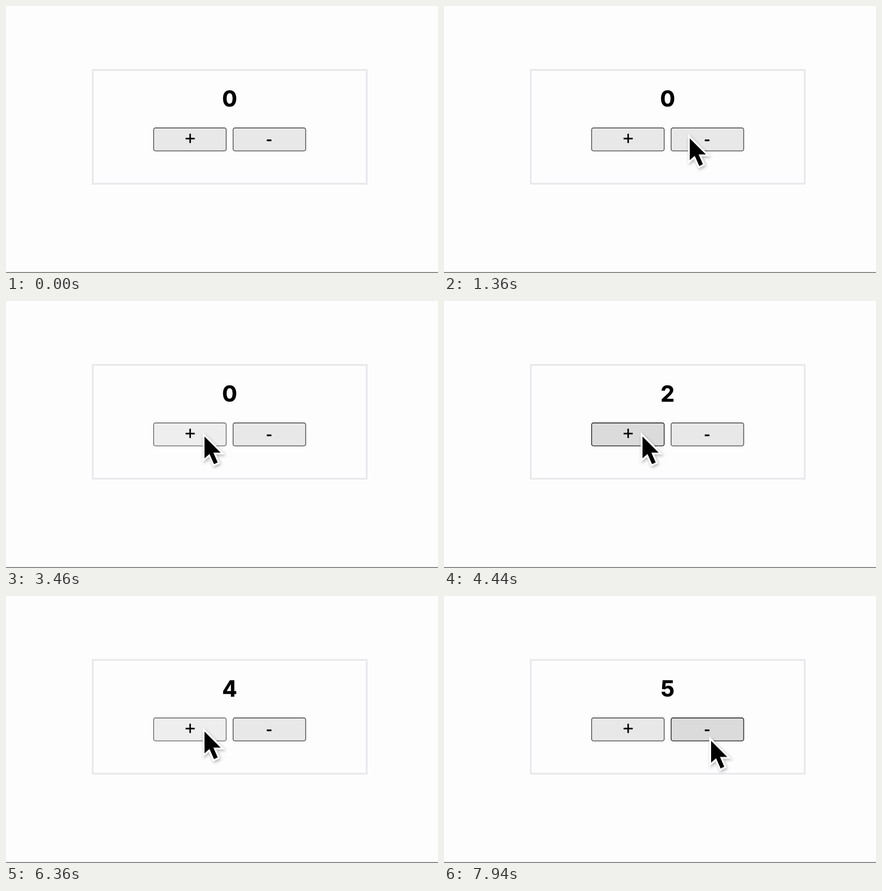
An HTML page for the animation above (8 s loop, 951 by 589 pixels).

```html
<!DOCTYPE html>
<html lang="en">
<head>
<meta charset="utf-8">
<title>Counter</title>
<style>
  html, body { margin: 0; width: 100%; height: 100%; overflow: hidden; background: #fdfdfd; }
  svg { display: block; }

  .count { font: 700 49px Inter, sans-serif; text-anchor: middle; stroke: #000; stroke-width: .6; animation: count 8s step-end infinite; }
  .sign { font: 40px "Liberation Sans", Arial, sans-serif; text-anchor: middle; stroke: #000; stroke-width: .5; }
  .button { fill: #e8e8e8; stroke: #555558; stroke-width: 1.8; }
  .plus { animation: plus 8s step-end infinite; }
  .minus { animation: minus 8s step-end infinite; }
  .pointer { animation: move 8s linear infinite, show 8s step-end infinite; filter: drop-shadow(2px 3px 3px rgba(0, 0, 0, .28)); }

  @keyframes count {
    0% { transform: translateY(0); }
    44.25% { transform: translateY(-100px); }
    45.5% { transform: translateY(-200px); }
    63.75% { transform: translateY(-300px); }
    73.5% { transform: translateY(-400px); }
    80.5%, 100% { transform: translateY(-500px); }
  }
  /* Idle, pressed (lighter) and hovered (darker) states */
  @keyframes plus {
    0%, 44.25%, 45.5%, 63.75%, 73.5%, 80.5%, 97.5%, 100% { fill: #e8e8e8; stroke: #555558; }
    43.25%, 45%, 62.5%, 72.5%, 79.5% { fill: #eee; stroke: #707070; }
    55.5%, 90.5% { fill: #dbdbdb; stroke: #2e2e2e; }
  }
  @keyframes minus {
    0% { fill: #e8e8e8; stroke: #555558; }
    97.75%, 100% { fill: #dbdbdb; stroke: #2e2e2e; }
  }
  @keyframes show {
    0% { visibility: hidden; }
    6.25%, 100% { visibility: visible; }
  }
  @keyframes move {
    0%, 6% { transform: translate(667px, 600px); animation-timing-function: cubic-bezier(.3, .4, .4, 1); }
    11.25%, 15% { transform: translate(594px, 281px); }
    17%, 18% { transform: translate(541px, 292px); animation-timing-function: cubic-bezier(.3, .2, .4, 1); }
    24%, 95% { transform: translate(437px, 299px); }
    97% { transform: translate(467.3px, 305px); }
    99.25%, 100% { transform: translate(588px, 319.5px); }
  }
</style>
</head>
<body>
<svg width="951" height="589" viewBox="0 0 951 589">
  <defs>
    <clipPath id="digit"><rect x="460" y="170" width="64" height="70"/></clipPath>
  </defs>
  <rect width="951" height="589" fill="#fdfdfd"/>
  <rect y="587" width="951" height="1.6" fill="#606064"/>
  <rect x="191" y="141" width="603" height="251" fill="none" stroke="#e9e9ed" stroke-width="4"/>

  <g clip-path="url(#digit)">
    <g class="count">
      <text x="492.3" y="222">0</text>
      <text x="492.3" y="322">1</text>
      <text x="492.3" y="422">2</text>
      <text x="492.3" y="522">3</text>
      <text x="492.3" y="622">4</text>
      <text x="492.3" y="722">5</text>
    </g>
  </g>

  <rect class="button plus" x="325" y="269" width="159.7" height="50.6" rx="4"/>
  <rect class="button minus" x="500" y="269" width="159.7" height="50.6" rx="4"/>
  <text class="sign" x="405.4" y="306">+</text>
  <text class="sign" x="579.2" y="307.2">-</text>

  <g class="pointer">
    <path d="M0 0V48L11 38.5L21 61L29 57L19.500 35.500H35.500Z" stroke="#fff" stroke-width="8" stroke-miterlimit="6" paint-order="stroke"/>
  </g>
</svg>
</body>
</html>
```
